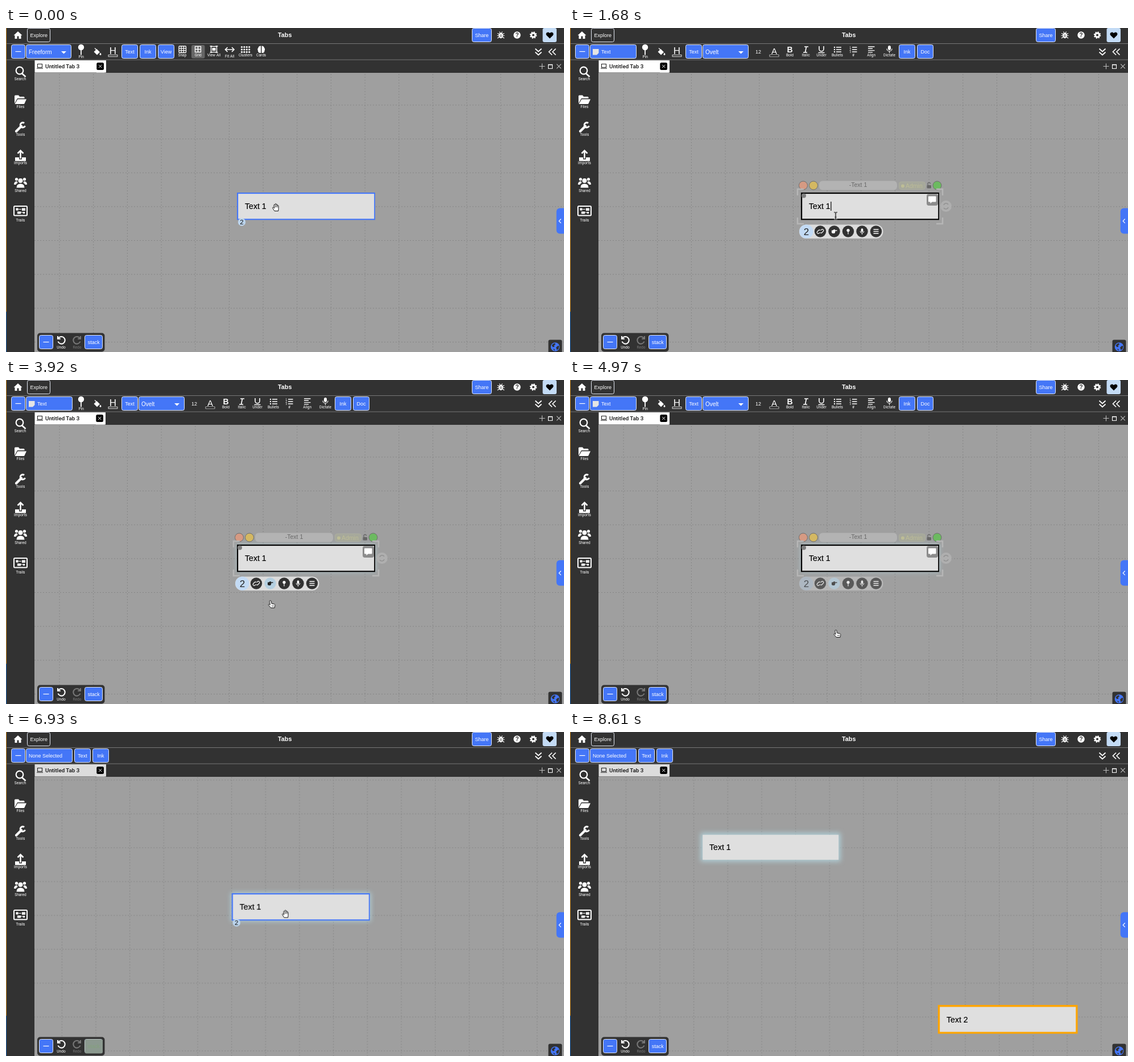
Write an HTML page that moves like this. It is 981x571 px and loops after 8.96 s.

```html
<!DOCTYPE html>
<html lang="en">
<head>
<meta charset="utf-8">
<title>Linked notes</title>
<style>
html, body { margin: 0; width: 100%; height: 100%; overflow: hidden; background: #9f9f9f; }
svg { display: block; width: 100vw; height: 100vh; }
text { font-family: "Liberation Sans", Arial, sans-serif; }
.rob { font-family: Roboto, sans-serif; }
.line { fill: none; stroke: #fff; }

/* One shared clock: every part loops over 8960 ms with hard steps by default. */
.t { animation: 8.96s step-end infinite; }
#bar1 { animation-name: bar1; }
#bar2, #black { animation-name: selected; }
#bar3 { animation-name: bar3; }
#tab { animation-name: tab; }
#tabEnd { animation-name: tabEnd; }
#grid { animation-name: grid; }
#doc { animation-name: pan; }
#blue, #badge, #hand { animation-name: hover; }
#glow { animation-name: glow; }
#chat { animation-name: chat; }
#deco { animation-name: deco; }
#caret { animation-name: caret; }
.dim { animation-name: dim; }
#linkOff { animation-name: linkOff; }
#linkOn { animation-name: linkOn; }
#chip { animation-name: chip; }
#tip { animation-name: tip; }
#stackOff { animation-name: stackOff; }
#cursor { animation-name: cursor; }
#beam { animation-name: beam; }
#point { animation-name: point; }

@keyframes bar1 { 0%, 56.25% { opacity: 1 } 5.469%, 75.781%, 100% { opacity: 0 } }
@keyframes selected { 0%, 56.25%, 100% { opacity: 0 } 5.469% { opacity: 1 } }
@keyframes bar3 { 0% { opacity: 0 } 75.781%, 100% { opacity: 1 } }
@keyframes tab { 0% { color: #fff } 75.781%, 100% { color: #dcdcdc } }
@keyframes tabEnd { 0%, 60.156% { transform: translateX(1px) } 9.375%, 79.241%, 100% { transform: none } }
@keyframes grid { 0% { transform: none } 75.781%, 100% { transform: translate(4.2px, 8.4px) } }
@keyframes pan {
  0% { transform: translate(0, 0) }
  76.451% { transform: translate(0, 0); animation-timing-function: ease-in-out }
  82.031%, 100% { transform: translate(-175px, -111px) }
}
@keyframes hover { 0%, 67.857% { opacity: 1 } 5.469%, 78.125%, 100% { opacity: 0 } }
@keyframes glow {
  0% { opacity: 0 }
  32.031% { opacity: 0; animation-timing-function: linear }
  34.375% { opacity: .4 }
  56.25%, 100% { opacity: .75 }
}
@keyframes chat { 0%, 56.25%, 100% { opacity: 0 } 9.375% { opacity: 1 } }
@keyframes deco {
  0%, 56.25%, 100% { opacity: 0 }
  12.5% { opacity: 0; animation-timing-function: linear }
  14.844% { opacity: 1 }
}
@keyframes caret { 0%, 21.875%, 30.469%, 100% { opacity: 0 } 16.406%, 28.125% { opacity: 1 } }
@keyframes dim {
  0% { opacity: 1 }
  47.656% { opacity: 1; animation-timing-function: linear }
  50%, 100% { opacity: var(--low) }
}
@keyframes linkOff { 0% { opacity: 1 } 30.469%, 100% { opacity: 0 } }
@keyframes linkOn { 0% { opacity: 0 } 30.469%, 100% { opacity: 1 } }
@keyframes chip { 0%, 42.969%, 100% { opacity: 0 } 22.321% { opacity: 1 } }
@keyframes tip {
  0%, 42.969%, 100% { opacity: 0 }
  24.219% { opacity: 0; animation-timing-function: linear }
  25.781% { opacity: 1 }
}
@keyframes stackOff { 0%, 79.241%, 100% { opacity: 0 } 75.781% { opacity: 1 } }
@keyframes cursor {
  0%, .4% { transform: translate(475px, 316px); animation-timing-function: ease-in-out }
  2.344%, 8.2% { transform: translate(470px, 315.5px); animation-timing-function: ease-in-out }
  10.938%, 18.4% { transform: translate(467px, 331px); animation-timing-function: ease-in-out }
  23.438%, 42% { transform: translate(463px, 357px); animation-timing-function: ease-in-out }
  46.094%, 62% { transform: translate(467.5px, 441px); animation-timing-function: ease-in-out }
  68.75%, 88% { transform: translate(492px, 320.5px); animation-timing-function: ease-in }
  92.969%, 100% { transform: translate(473px, 576px) }
}
@keyframes beam { 0%, 22.321%, 100% { opacity: 0 } 5.469% { opacity: 1 } }
@keyframes point { 0%, 67.857% { opacity: 0 } 22.321%, 78.125%, 100% { opacity: 1 } }
</style>
</head>
<body>
<svg id="stage" viewBox="0 0 981 571" preserveAspectRatio="none"></svg>
<script>
const BLUE = '#4476f7', DARK = '#323232', PALE = '#c3dbf5';

const text = (x, y, s, size = 9, more = 'fill="#fff"') =>
  `<text x="${x}" y="${y}" font-size="${size}" ${more}>${s}</text>`;
const mid = (x, y, s, size = 9, more = 'fill="#fff"') =>
  text(x, y, s, size, more + ' text-anchor="middle"');
const label = (x, y, s, fill = '#fff') => mid(x, y, s, 6.6, `class="rob" fill="${fill}"`);
const rect = (x, y, w, h, fill, r = 0, more = '') =>
  `<rect x="${x}" y="${y}" width="${w}" height="${h}" rx="${r}" fill="${fill}" ${more}/>`;
const dot = (x, y, r, fill = '#fff', more = '') =>
  `<circle cx="${x}" cy="${y}" r="${r}" fill="${fill}" ${more}/>`;
const line = (d, w = 1.5, more = '') => `<path class="line" d="${d}" stroke-width="${w}" ${more}/>`;
const fill = (d, c = '#fff', more = '') => `<path d="${d}" fill="${c}" ${more}/>`;
const at = (x, y, s, more = '') => `<g transform="translate(${x} ${y}) ${more}">${s}</g>`;
const timed = (id, s) => `<g id="${id}" class="t">${s}</g>`;
const times = (n, f) => Array.from({ length: n }, (_, i) => f(i)).join('');

// Outlined boxes take whole pixels so that the 1px border stays sharp.
const box = (x, y, w, h, c = BLUE) => rect(x + .5, y + .5, w - 1, h - 1, c, 3, 'stroke="#e4e8f2"');
const button = (x, w, s) => box(x, 29, w, 25) + mid(x + w / 2, 45, s);
const drop = (x, w, s) => box(x, 29, w, 25) + text(x + 5, 46, s, 10) +
  fill(`M${x + w - 18} 41h9l-4.5 4.5z`);
const minus = (x, y) => box(x, y, 25, 25) + line(`M${x + 7.5} ${y + 12.5}h10`, 1.2);
const cross = (x, y, r, w, c = '#fff') =>
  line(`M${x - r} ${y - r}l${2 * r} ${2 * r}m0 ${-2 * r}l${-2 * r} ${2 * r}`, w, `style="stroke:${c}"`);

function grid() {
  const step = 59.67;
  return line(times(18, i => `M${34.4 + i * step} 16V600`) + times(11, i => `M-20 ${16.5 + i * step}H1010`),
    1, 'style="stroke:#868686" stroke-dasharray="2 3"');
}

const note = (x, y, s, border) => border + rect(x, y, 239, 44, '#dfdfdf') +
  text(x + 11.9, y + 27, s, 14, 'fill="#000" stroke="#000" stroke-width=".2"');

const frame = (id, c) => timed(id, rect(406, 290, 243, 48.3, c));

function decoration() {
  const ring = (x, c) => dot(x, 277.5, 7.5, c, 'stroke="#6d6d6d"');
  const icon = (x, s) => dot(x, 358.5, 10.2, DARK) + at(x, 358.5, s);
  const link = line('M-1 2l-1.5 1.5a2.2 2.2 0 0 1-3-3l2.5-2.5a2.2 2.2 0 0 1 3 0M1-2l1.5-1.5a2.2 2.2 0 0 1 3 3L3 2a2.2 2.2 0 0 1-3 0', 1.2);
  const fist = c => fill('M-4.5-2h2l2-1.5h2l-.5 1.3h4v1.5H1.5l.5 1-.5 1-.3 1.3-1 .9h-2.7l-2-1z', c);
  const mic = fill('M-1.8-3.5a1.8 1.8 0 0 1 3.6 0v3a1.8 1.8 0 0 1-3.6 0z') +
    line('M-3.3-.5a3.3 3.3 0 0 0 6.6 0M0 3v2.5', 1);
  const bold = 'class="rob" font-weight="700" fill="#fff"';
  return ring(410, '#d69a83') + ring(428, '#d4b862') +
    rect(438, 269.5, 137, 16, '#b3b3b3', 6) + mid(506.5, 280, '-Text 1', 10.5, 'fill="#686868"') +
    rect(578.5, 271, 46, 13.5, '#a6a89b', 4, 'stroke="#adaf9f"') +
    dot(585, 278.5, 3, '#bdbd96') + text(590, 282, 'Admin', 10.5, 'fill="#bdbd96"') +
    rect(627.5, 277, 7.5, 5.5, '#666', 1) +
    line('M629 277v-2.5a2.2 2.2 0 0 1 4.4 0', 1.3, 'style="stroke:#666"') +
    ring(645.5, '#6cba60') +
    line('M400 295V284h11M644 284h11v11M655 334v11h-11M411 345h-11v-11', 2.5, 'style="stroke:#b6b6b6"') +
    dot(661, 314, 10, '#afafaf') +
    line('M657 312a4.5 4.5 0 0 1 8-1M665 316a4.5 4.5 0 0 1-8 1', 1.5, 'style="stroke:#929292"') +
    `<g class="t dim" style="--low:.4">${rect(403, 346.5, 147.5, 24.5, '#dcdcdc', 12) + dot(415.5, 358.7, 12.2, PALE)}</g>` +
    `<g class="t dim" style="--low:.7">${
      mid(415.5, 364.5, '2', 17, 'fill="#222"') + icon(440, link) +
      timed('linkOff', icon(464.5, fist('#fff'))) +
      timed('linkOn', dot(464.5, 358.5, 10.2, '#b4cfe0') + at(464.5, 358.5, fist('#222'))) +
      icon(489, dot(0, -2, 2.6) + line('M0 0v5', 1.2)) + icon(513.5, mic) +
      icon(538, line('M-4.5-3.5h9M-4.5 0h9M-4.5 3.5h9', 1.4))}</g>` +
    timed('chip', rect(456.5, 335, 16.5, 16, '#222', 2) + rect(460, 339, 9.5, 8, '#fff', 1) +
      line('M460 341.5h9.5', .8, 'style="stroke:#222"')) +
    timed('tip', rect(397, 379.5, 135, 37, '#666', 3) +
      text(404.5, 394.7, 'Set onClick to follow primary', 9, bold) + text(404.5, 408, 'link', 9, bold));
}

function doc() {
  return `<rect id="glow" class="t" x="404.7" y="288.5" width="246" height="51" fill="#b4dbe6" filter="url(#soft)"/>` +
    note(408.2, 292.2, 'Text 1', frame('black', '#000') + frame('blue', BLUE)) +
    timed('badge', dot(414.5, 342, 6.7, '#bcd5ee') + mid(414.5, 346, '2', 11.5, 'fill="#111"')) +
    note(825.2, 595.5, 'Text 2', rect(821.8, 592, 245.7, 50.7, '#ffa500')) +
    timed('chat', rect(627, 292.5, 20, 20.5, '#8c8c8c', 4) +
      fill('M631 296.5h11.5q1 0 1 1v8q0 1-1 1h-6l-3 2.8v-2.8h-2.5q-1 0-1-1v-8q0-1 1-1z')) +
    timed('deco', dot(411, 295.5, 4, '#808080') + decoration()) +
    timed('caret', rect(458.3, 306, 1.2, 16, '#000'));
}

function topBar() {
  const legs = 'M-6-3l3 1.5M6-3l-3 1.5M-6.5 1h13M-6 5.5l3-2M6 5.5l-3-2M-2.5-6l1 2M2.5-6l-1 2';
  return fill('M13.5 13L21 6l7.5 7h-2v6h-4v-4.5h-3V19h-4v-6z') +
    box(37, 0, 41, 25, DARK) + mid(57.7, 15.5, 'Explore') +
    mid(490.2, 16, 'Tabs', 10.8, 'fill="#fff" font-weight="700"') +
    box(819, 0, 35, 25) + mid(836.5, 15.5, 'Share') +
    at(870, 12.5, '<ellipse cy=".8" rx="3.8" ry="5" fill="#fff"/>' + line(legs, 1.2) +
      line('M-1.8 0h3.6M-1.8 2.5h3.6', .9, `style="stroke:${DARK}"`)) +
    dot(898.5, 12.5, 6.2) + mid(898.5, 16.2, '?', 10, `fill="${DARK}" font-weight="700"`) +
    at(927, 12.5, `<circle class="line" r="3.5" stroke-width="3"/>
      <circle class="line" r="5.3" stroke-width="2" stroke-dasharray="2.08"/>`) +
    rect(943.5, 0, 24.5, 25, PALE, 3) +
    fill('M956 18.5l-5.3-5.3c-3.5-4 2-8.2 5.3-4.2c3.3-4 8.8.2 5.3 4.2z', '#000');
}

function tools() {
  return at(132, 34, dot(0, 0, 5.2) + line('M0 5v8.5', 1.8)) + label(132.3, 52.5, 'Pin') +
    at(159, 42, fill('M-4.5 0L.5-5 6 .5 1 5.5z') + line('M-3-6.5L1-2.5', 1.2)) +
    fill('M166 43.5q3 4 0 4.5q-3-.5 0-4.5z') +
    mid(188, 46, 'H', 17) + rect(180, 47.5, 16, 3, DARK, 0, 'stroke="#fff" stroke-width=".8"') +
    button(203, 29, 'Text');
}

function freeformBar() {
  const frameAt = x => rect(x - 5, 32.5, 10, 10, 'none', 0, 'stroke="#fff" stroke-width="1.4"');
  const dots = times(12, i => dot(414.5 + i % 4 * 4.4, 33.5 + (i / 4 | 0) * 4.4, 1.6));
  return drop(35, 80, 'Freeform') + tools() + button(235, 29, 'Ink') + button(267, 29, 'View') +
    rect(304, 32, 12.5, 11.5, 'none', 1, 'stroke="#fff" stroke-width="1.3"') +
    line('M308.2 32v11.5M312.3 32v11.5M304 35.8h12.5M304 39.7h12.5', 1.2) + label(310, 50, 'Snap') +
    rect(326, 30, 23.5, 23.5, '#666', 3) + frameAt(337.5) + line('M337.5 32.5v10M332.5 37.5h10') + label(337.7, 50, 'Grid') +
    frameAt(365.5) + rect(362.5, 35, 6, 5, '#fff') + line('M358.5 32h4M368.5 32h4M358.5 43h4M368.5 43h4', 1.3) +
    label(365.5, 50, 'View All') +
    line('M386 38h14.5M389.5 34l-4 4 4 4M397 34l4 4-4 4', 1.7) + label(393.3, 52, 'Fit All') +
    dots + label(421, 50, 'Clusters') +
    fill('M448 31.5v12.5q-5 .5-5-4q-1.5-3 .5-5q.5-3.5 4.5-3.5zM449.5 31.5v12.5q5 .5 5-4q1.5-3-.5-5q-.5-3.5-4.5-3.5z') +
    label(448.7, 50, 'Cards');
}

function textBar() {
  const rows = (x, w) => line(`M${x} 34h${w}M${x} 38h${w}M${x} 42h${w}`, 1.4);
  return box(35, 29, 82, 25) + text(55, 45, 'Text') + fill('M40 37h10.5v7l-3.5 3.5H40z', '#e4e4e4') +
    tools() + drop(233, 81, 'Ovelt') + mid(331, 45, '12') +
    mid(359, 45.5, 'A', 15) + rect(351, 47.5, 16, 2.8, '#000', 0, 'stroke="#fff" stroke-width=".7"') +
    mid(386.5, 43, 'B', 14, 'fill="#fff" font-weight="700"') + label(386.5, 50, 'Bold') +
    line('M412 33h7M410 43h7M415.5 33l-2 10', 1.7) + label(414.5, 50, 'Italic') +
    line('M438 32v5a4 4 0 0 0 8 0v-5M436.5 43.5h11', 1.6) + label(442, 50, 'Under') +
    rows(468, 9) + times(3, i => dot(465, 34 + 4 * i, 1.2)) + label(470, 50, 'Bullets') +
    rows(496, 8.5) + times(3, i => text(491.5, 35.8 + 4 * i, i + 1, 4.5)) + label(498, 50, '#') +
    line('M524 33h11.5M524 36.3h8M524 39.6h11.5M524 42.9h8', 1.4) + label(529.7, 50, 'Align') +
    rect(559, 31, 5, 8, '#fff', 2.5) + line('M557 36.5a4.5 4.5 0 0 0 9 0M561.5 41v3', 1.2) + label(561.5, 50, 'Dictate') +
    button(578, 29, 'Ink') + button(610, 29, 'Doc');
}

const emptyBar = () => box(35, 29, 82, 25) + text(40, 45, 'None Selected') +
  button(120, 29, 'Text') + button(152, 29, 'Ink');

function tabStrip() {
  const soft = '#bdbdbd';
  const tab = rect(50.5, 57, 123, 21.5, 'currentColor') +
    line('M55.5 63.5h8v6h-8zM54 71.3h11', 1.1, 'style="stroke:#222"') +
    text(69, 70.8, 'Untitled Tab 3', 9.8, 'class="rob" font-weight="500" fill="#111"') +
    timed('tabEnd', rect(158, 57, 17, 21.5, 'currentColor') + rect(158.3, 61, 12.7, 13, '#000', 2.5) +
      cross(164.7, 67.5, 2.6, 1));
  return timed('tab', tab) + line('M937.5 67.5h10M942.5 62.5v10', 1.1, `style="stroke:${soft}"`) +
    line('M953.5 64.5h7v7h-7z', 1.1) + line('M953 64.7h8', 1.6) + cross(972, 67.5, 3.8, 1.1, soft);
}

function sideBar() {
  return line('M28.5 80.5l6 5.5', 2.6) + dot(24, 75, 6.3, 'none', 'class="line" stroke-width="2.2"') + label(25, 92, 'Search') +
    fill('M15 133v-13q0-1.5 1.5-1.5h5.5l2 2.5h7q1.5 0 1.5 1.5v1.500H20z') + fill('M20.5 125.5h15.500l-4 8.500H15.500z') + label(25.5, 141, 'Files') +
    line('M18 182l9-9', 4.2, 'stroke-linecap="round"') + line('M32 167.5a4.3 4.3 0 1 0 1.5 5', 3) + label(25.3, 190, 'Tools') +
    line('M25.5 230v-12M20.5 221l5-5 5 5', 2.5) + fill('M16 228h7v3.5h5V228h7v6.5H16z') + label(25.5, 239.7, 'Imports') +
    dot(25.5, 269, 4) + dot(18.5, 266.5, 2.6) + dot(32.5, 266.5, 2.6) +
    fill('M18.5 281.5q0-7 7-7t7 7zM14 276q0-6 5.5-6l1 3q-2.5 1-3 3zM37 276q0-6-5.5-6l-1 3q2.5 1 3 3z') + label(25.5, 288.5, 'Shared') +
    rect(14, 314, 23, 16.5, 'none', 1.5, 'stroke="#fff" stroke-width="2"') + rect(17.5, 317.5, 4, 4, '#fff') +
    rect(28, 317.5, 6, 4.5, '#fff') + rect(20, 323.5, 6, 4, '#fff') + dot(31.5, 325.5, 1.8) + line('M22 319.5h5M26 325h4', 1) +
    label(25.5, 340.5, 'Trails');
}

function corners() {
  const arrow = c => line('M-5.5-3a6.3 6.3 0 1 1-.5 5.5M-6.5-7v4.8h4.8', 2.1, `style="stroke:${c}"`);
  return rect(55, 537.5, 118.5, 33, DARK, 5) + minus(58, 541) +
    at(97.5, 550, arrow('#fff')) + label(97, 564.5, 'Undo') +
    at(124.5, 550, arrow('#777'), 'scale(-1 1)') + label(125, 564.5, 'Redo', '#777') +
    box(138, 541, 32, 25) + mid(154.3, 557, 'stack') +
    timed('stackOff', rect(138.5, 541.5, 31.5, 25, '#8b998f', 3) + mid(154.3, 557, 'stack', 9, 'fill="#83a27c"')) +
    rect(967.7, 317.5, 18, 45, BLUE, 6) + line('M975.7 336.5l-3.5 3.7 3.5 3.7', 1.2) +
    rect(953.5, 549.5, 24, 26, DARK, 3) + dot(965.5, 562, 7.8, BLUE) +
    fill('M959.5 559.5q2-3.500 5.500-4l1 2-2.500 2 1 2-3 1zM967 563l3.500-3 2 .5-1 5-3 2zM961.500 565.500l3 .5.500 3z', DARK);
}

const cursors = timed('cursor',
  timed('hand', fill('M-3 6.5L-6.3 1.3c-.6-1.5 1.1-2 1.9-.8l1.1 1.2-.8-5.3c0-1.5 1.7-1.6 2-.2l.2-1.7c.2-1.3 1.9-1.3 2 0v1.2c.3-1.4 2-1.2 2 .2v1.4c.4-1.1 2-.9 2 .4V2.5L3.7 6.5z', '#fff', 'stroke="#111"') +
    line('M-1.9-3.5l.4 3.5M.1-3.8V0M2.1-3.3V.3', .8, 'style="stroke:#222"')) +
  timed('beam', ['#c8c8c8', '#111'].map((c, i) =>
    line('M-3-6.5q3 0 3 1.5q0-1.5 3-1.5M0-5V5M-3 6.5q3 0 3-1.5q0 1.5 3 1.5M-1.5 2h3', 2.6 - 1.5 * i, `style="stroke:${c}"`)).join('')) +
  timed('point', fill('M-1.5 1.2a1.4 1.4 0 0 1 2.8-.3L2.2 5l4.3.8c1.3.3 1.8 1 1.6 2.3l-.8 4.4H.8c-1-2-2.3-2.8-4-4.6c-.8-1.3.6-2.2 1.7-1.3l1 .8z', '#fff', 'stroke="#111"') +
    line('M3.2 8v2.5M5.2 8v2.5', .8, 'style="stroke:#222"')));

const chrome = rect(0, 0, 981, 79, DARK) + rect(0, 0, 50, 571, DARK) +
  rect(0, 0, 1, 500, '#c98a24') + rect(0, 500, 1, 71, '#1f62a8') +
  rect(1, 27, 980, 1, '#777') + rect(1, 55.5, 980, 1, '#777');

const chevrons = line('M930.5 36.5l5.5 5 5.5-5M930.5 42.5l5.5 5 5.5-5M960 36.5l-5.5 5.5 5.5 5.5M966.5 36.5l-5.5 5.5 5.5 5.5', 1.7);

document.getElementById('stage').innerHTML =
  '<defs><filter id="soft" x="-20%" y="-60%" width="140%" height="220%"><feGaussianBlur stdDeviation="4"/></filter></defs>' +
  rect(0, 0, 981, 571, '#9f9f9f') + timed('grid', grid()) + timed('doc', doc()) +
  chrome + topBar() + minus(9, 29) + timed('bar1', freeformBar()) + timed('bar2', textBar()) +
  timed('bar3', emptyBar()) + chevrons + tabStrip() + sideBar() + corners() + cursors;
</script>
</body>
</html>
```
